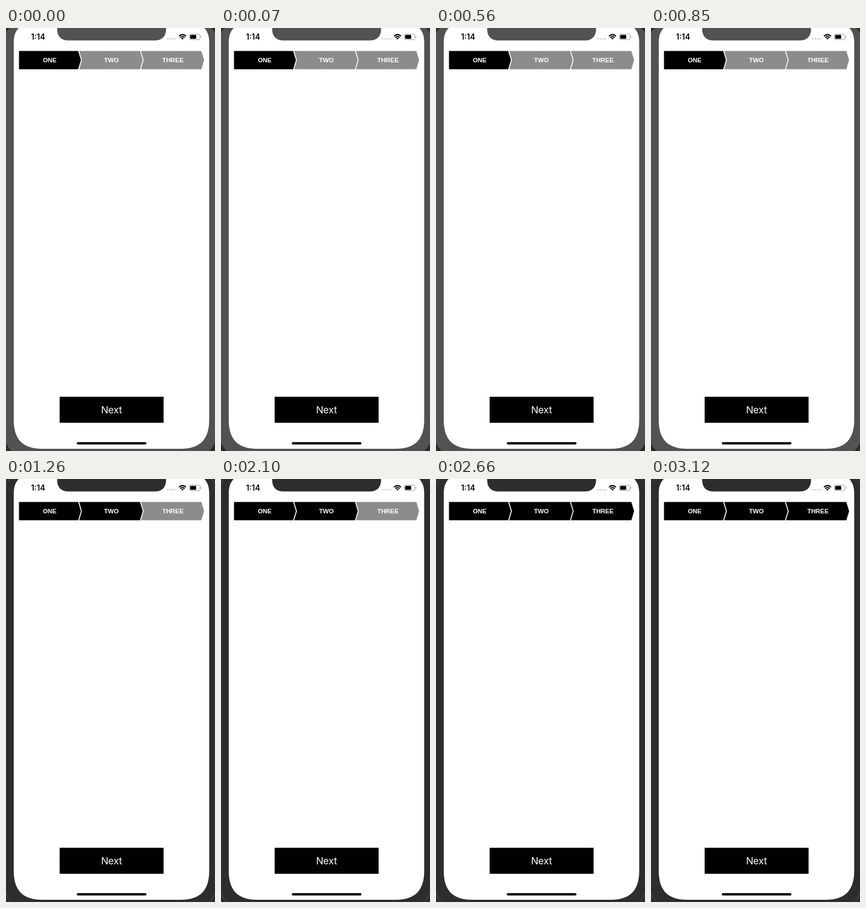
An HTML page for the animation above (3430 ms loop, 378 by 764 pixels).

```html
<!DOCTYPE html>
<html lang="en">
<head>
<meta charset="utf-8">
<style>
  html, body { margin: 0; width: 100%; height: 100%; overflow: hidden; }
  svg { display: block; width: 100%; height: 100%; }
  text { text-anchor: middle; font-family: Inter, sans-serif; }
  .step text { fill: #fff; font: bold 11.4px "Liberation Sans", Arial, sans-serif; }
</style>
</head>
<body>
<svg viewBox="0 0 378 764">
  <rect id="bezel" width="378" height="764"/>
  <g id="rim" fill="#2b2b2d">
    <path d="M-1 9Q3 4 8-1H-1ZM379 9Q375 4 370-1H379ZM-1 747Q3 757 11 765H-1ZM379 747Q375 757 367 765H379Z"/>
  </g>
  <path fill="#fff" d="M14 26C14 14 17 6 23 0H92.500V2C92.500 15 100 22.500 113 22.500H269C282 22.500 289.500 15 289.500 2V0H358.500C364.500 6 367.500 14 367.500 26V708C367.500 743 351 760 316 760H65.500C30.500 760 14 743 14 708Z"/>

  <text x="58" y="21.300" font-size="14" font-weight="600">1:14</text>
  <g fill="#cfcfcf">
    <circle cx="292.500" cy="19.500" r="1.500"/><circle cx="297" cy="19.500" r="1.500"/>
    <circle cx="301.500" cy="19.500" r="1.500"/><circle cx="306" cy="19.500" r="1.500"/>
  </g>
  <g fill="none" stroke="#000" stroke-width="2">
    <path d="M312.800 14.800Q319.200 9 325.600 14.800M315.200 17.300Q319.200 13.700 323.200 17.300"/>
  </g>
  <path d="M316.900 18.700Q319.200 16.800 321.500 18.700L319.200 21Z"/>
  <rect x="331.500" y="11" width="19.500" height="10" rx="2.700" fill="none" stroke="#999"/>
  <rect x="333" y="12.500" width="11" height="7" rx="1.300"/>
  <path fill="#999" d="M352.500 14.300Q355 16 352.500 17.700Z"/>

  <g id="steps"></g>

  <rect x="97" y="666" width="188" height="47"/>
  <text x="190.800" y="696" font-size="17.500" letter-spacing="-.2" fill="#fff">Next</text>
  <rect x="128" y="748" width="126" height="4.300" rx="2.150"/>
</svg>
<script>
  const LOOP = 3430;
  const DIM_AT = 1050;
  const steps = [
    { label: "ONE", left: 23.5, right: 130.5, center: 79, activeAt: 0 },
    { label: "TWO", left: 132.3, right: 242.3, center: 190.5, activeAt: 1260 },
    { label: "THREE", left: 244, right: 353.3, center: 302, activeAt: 2660 },
  ];
  const byId = id => document.getElementById(id);

  byId("steps").innerHTML = steps.map(({ label, left, right, center }, i) => {
    const inset = i ? left + 5 : left;
    return `<g class="step">
      <path d="M${left} 41.500H${right}L${right + 5} 58L${right} 74.500H${left}L${inset} 58Z"/>
      <text x="${center}" y="62.200">${label}</text></g>`;
  }).join("");
  const arrows = document.querySelectorAll(".step path");

  function draw() {
    const t = performance.now() % LOOP;
    const dimmed = t >= DIM_AT;
    byId("bezel").setAttribute("fill", dimmed ? "#2d2d2d" : "#525252");
    byId("rim").setAttribute("stroke", dimmed ? "#555" : "none");
    steps.forEach((step, i) =>
      arrows[i].setAttribute("fill", t >= step.activeAt ? "#000" : "#8c8c8c"));
    requestAnimationFrame(draw);
  }
  draw();
</script>
</body>
</html>
```
